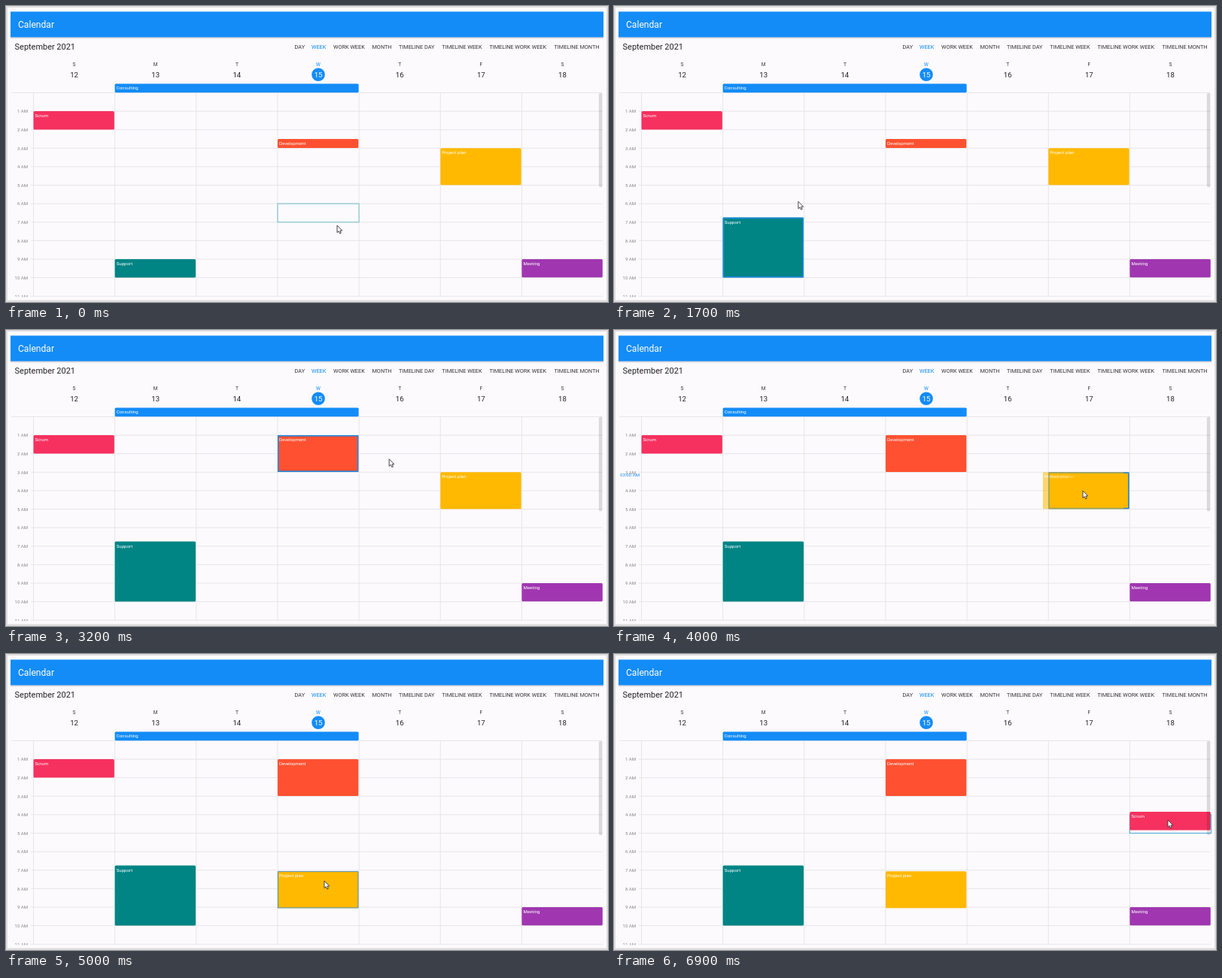
An HTML page that plays this animation: 800x394 px, repeating every 7 s.

```html
<!DOCTYPE html>
<html lang="en">
<head>
<meta charset="utf-8">
<title>Calendar</title>
<style>
html, body { margin: 0; width: 100%; height: 100%; overflow: hidden; background: #fcfafd; }
svg { display: block; width: 100%; height: 100%; font-family: Roboto, sans-serif; }
</style>
</head>
<body>
<svg id="stage" viewBox="0 0 800 394"></svg>
<script>
const LOOP = 7000, STEP = 100;
const LEFT = 36.5, COL = 108.15, TOP = 115.4, HOUR = 24.62;
const BLUE = '#138cf7', BG = '#fcfafd', GRID = '#e7e5e8';
const stage = document.getElementById('stage');
const colX = c => LEFT + COL * c;
const hourY = h => TOP + HOUR * h;

function add(tag, attrs, parent = stage) {
  const el = document.createElementNS('http://www.w3.org/2000/svg', tag);
  set(el, attrs);
  parent.appendChild(el);
  return el;
}
function set(el, attrs) {
  for (const k in attrs) el.setAttribute(k, attrs[k]);
}
function text(str, x, y, size, fill, anchor = 'start', parent = stage) {
  const el = add('text', { x, y, 'font-size': size, fill, 'text-anchor': anchor }, parent);
  el.textContent = str;
  return el;
}
const box = (x, y, width, height, fill, rx = 0) => add('rect', { x, y, width, height, fill, rx });
const show = (el, on) => el.setAttribute('visibility', on ? 'visible' : 'hidden');

// Page frame and header bar
box(0, 0, 800, 394, '#dddddd');
box(2, 2, 796, 389.5, BG);
box(6, 41, 788, 3, '#000').setAttribute('opacity', .05);
box(6, 41, 788, 1.6, '#000').setAttribute('opacity', .12);
box(6, 7.5, 788, 34, BLUE);
text('Calendar', 16, 29.2, 12.1, '#fff');
text('September 2021', 11.6, 58, 10.95, '#222');

[['DAY', 383.5], ['WEEK', 406], ['WORK WEEK', 435], ['MONTH', 486.5], ['TIMELINE DAY', 522],
 ['TIMELINE WEEK', 579.3], ['TIMELINE WORK WEEK', 642.4], ['TIMELINE MONTH', 728.5]]
  .forEach(([name, x]) => text(name, x, 57, 7.3, name === 'WEEK' ? BLUE : '#333'));

// Day headings
[...'SMTWTFS'].forEach((d, i) => {
  const x = colX(i + .5), today = i === 3;
  if (today) add('circle', { cx: x, cy: 91.2, r: 8.8, fill: BLUE });
  text(d, x, 79.5, 6.6, today ? BLUE : '#333', 'middle');
  text(12 + i, x, 94.7, 9.6, today ? '#fff' : '#222', 'middle');
});

// Hour grid
add('rect', { x: 0, y: 0, width: 800, height: 387.2 }, add('clipPath', { id: 'view' }));
const grid = add('g', { 'clip-path': 'url(#view)' });
const line = (x1, y1, x2, y2) => add('line', { x1, y1, x2, y2, stroke: GRID, 'stroke-width': 1 }, grid);
line(7, 115.4, 793, 115.4);
for (let c = 0; c < 7; c++) line(colX(c), 115, colX(c), 387);
for (let h = 1; h < 12; h++) {
  line(33, hourY(h), 793, hourY(h));
  text(h + ' AM', 29, hourY(h) + 2.3, 6, '#858585', 'end', grid);
}

function makeEvent(name, fill, width = 107.4) {
  const g = add('g', {});
  const body = add('rect', { width, rx: 1.5, fill }, g);
  const edge = add('rect', { fill: 'none', stroke: '#2088e0' }, g);
  text(name, 2, 8, 6.1, '#fff', 'start', g);
  // border: 0 for none, otherwise the stroke width
  return (x, y, height, border = 0, opacity = 1) => {
    set(g, { transform: `translate(${x} ${y})`, opacity });
    body.setAttribute('height', height);
    set(edge, {
      x: border / 2, y: border / 2, width: width - border, height: height - border,
      'stroke-width': border
    });
    show(edge, border > 0);
    show(g, opacity > 0);
  };
}

const PINK = '#f6315f', AMBER = '#ffb900';
makeEvent('Consulting', BLUE, 324)(colX(1), 103.4, 11.8);
makeEvent('Meeting', '#a037b0')(colX(6), hourY(9), 24.3);
const cell = add('rect', { width: COL, height: HOUR, fill: 'none', 'stroke-width': 1.2 });
const support = makeEvent('Support', '#008484');
const develop = makeEvent('Development', '#ff5131');
const plan = makeEvent('Project plan', AMBER);
const scrum = makeEvent('Scrum', PINK);
const planGhost = makeEvent('Project plan', AMBER);
const scrumGhost = makeEvent('Scrum', PINK);
const clock = text('', 8, 0, 6.1, BLUE);
box(787.8, 115.8, 4.6, 125.6, '#000', 2.3).setAttribute('opacity', .13);

// Pointers: the arrow hangs from its tip, the resize mark is centred
const ink = { fill: '#fff', stroke: '#333', 'stroke-width': .9, 'stroke-linejoin': 'round' };
const arrow = add('path', { d: 'M0 0V9.6L2.2 7.6 3.7 10.9 5.3 10.2 3.9 7H6.8Z', ...ink });
const resize = add('path', {
  d: 'M0-6.6L3.4-3H1.2V3H3.4L0 6.6-3.4 3H-1.2V-3H-3.4Z', ...ink
});

// Each track is a list of [time, value, ...]
const pointer = [
  [0, 440, 292], [500, 201.5, 337], [600, 201.5, 336], [900, 201.5, 317], [1400, 201.5, 281],
  [1600, 201.5, 281], [2100, 418.5, 177], [2200, 418.5, 176], [2500, 418.5, 149],
  [2700, 418.5, 140], [2900, 418.5, 140], [3600, 630, 214], [3900, 630, 214],
  [4000, 623, 214], [4700, 423, 314], [4800, 423, 314], [5000, 423, 302], [5100, 420, 300],
  [5500, 88, 151], [5600, 88, 151], [5900, 324, 213], [6300, 600, 220], [6600, 736, 221]
];
const supportTop = [[600, hourY(9)], [900, 322.8], [1400, hourY(6.75)]];
const developTop = [[2200, hourY(2.5)], [2500, 150.2], [2700, hourY(1)]];
const planDrag = [[3900, colX(5), hourY(3)], [4000, 570, hourY(3)], [4700, 370, 289.3]];
const scrumDrag = [[5640, LEFT, hourY(1)], [5900, 215.8, 196.1], [6300, 520, 208], [6600, colX(6), 210]];

function at(keys, t) {
  let i = keys.findIndex(k => k[0] > t);
  if (i === 0) return keys[0].slice(1);
  if (i < 0) return keys[keys.length - 1].slice(1);
  const a = keys[i - 1], b = keys[i], p = (t - a[0]) / (b[0] - a[0]);
  return a.slice(1).map((v, n) => v + (b[n + 1] - v) * p);
}
const during = (t, from, to) => t >= from && t < to;

function render(t) {
  const planning = during(t, 3900, 4800), moving = during(t, 5700, 6700);
  const [sy] = at(supportTop, t), [dy] = at(developTop, t);
  const [px, py] = at(planDrag, t), [gx, gy] = at(scrumDrag, t);

  support(colX(1), sy, hourY(10) - sy - .2, during(t, 500, 2100) ? 1.6 : 0);
  develop(colX(3), dy, hourY(3) - dy - .3, during(t, 2100, 3800) ? 1.6 : 0);

  if (t < 4800) plan(colX(5), hourY(3), 49, planning ? 1.6 : 0);
  else plan(colX(3), 289.3, 49, t < 5500 ? .8 : 0);
  planGhost(px, py, 49, 0, planning ? .55 : 0);

  if (t < 6700) scrum(LEFT, hourY(1), 24.4, t >= 5500 ? 1.6 : 0);
  else scrum(colX(6), 210, 24.4);
  scrumGhost(gx, gy, 24.4, 0, moving ? .52 : 0);

  const early = t < 400;
  set(cell, {
    x: colX(early ? 3 : 6), y: hourY(early ? 6 : 4),
    stroke: early ? '#86c6d0' : '#5ab0dc'
  });
  show(cell, early || t >= 6700);

  const y = planning ? py : gy;
  const mins = Math.floor((y - TOP) / HOUR * 60 + .01);
  const pad = n => String(n).padStart(2, '0');
  clock.textContent = `${pad(Math.floor(mins / 60))}:${pad(mins % 60)} AM`;
  clock.setAttribute('y', y + 5.9);
  show(clock, planning || moving);

  const sizing = during(t, 500, 1700) || during(t, 2100, 2900);
  const spot = `translate(${at(pointer, t).join(' ')})`;
  arrow.setAttribute('transform', spot);
  resize.setAttribute('transform', spot);
  show(arrow, !sizing);
  show(resize, sizing);
}

const start = performance.now();
function tick() {
  const t = (performance.now() - start) % LOOP;
  render(Math.floor(t / STEP) * STEP);
  requestAnimationFrame(tick);
}
tick();
</script>
</body>
</html>
```
